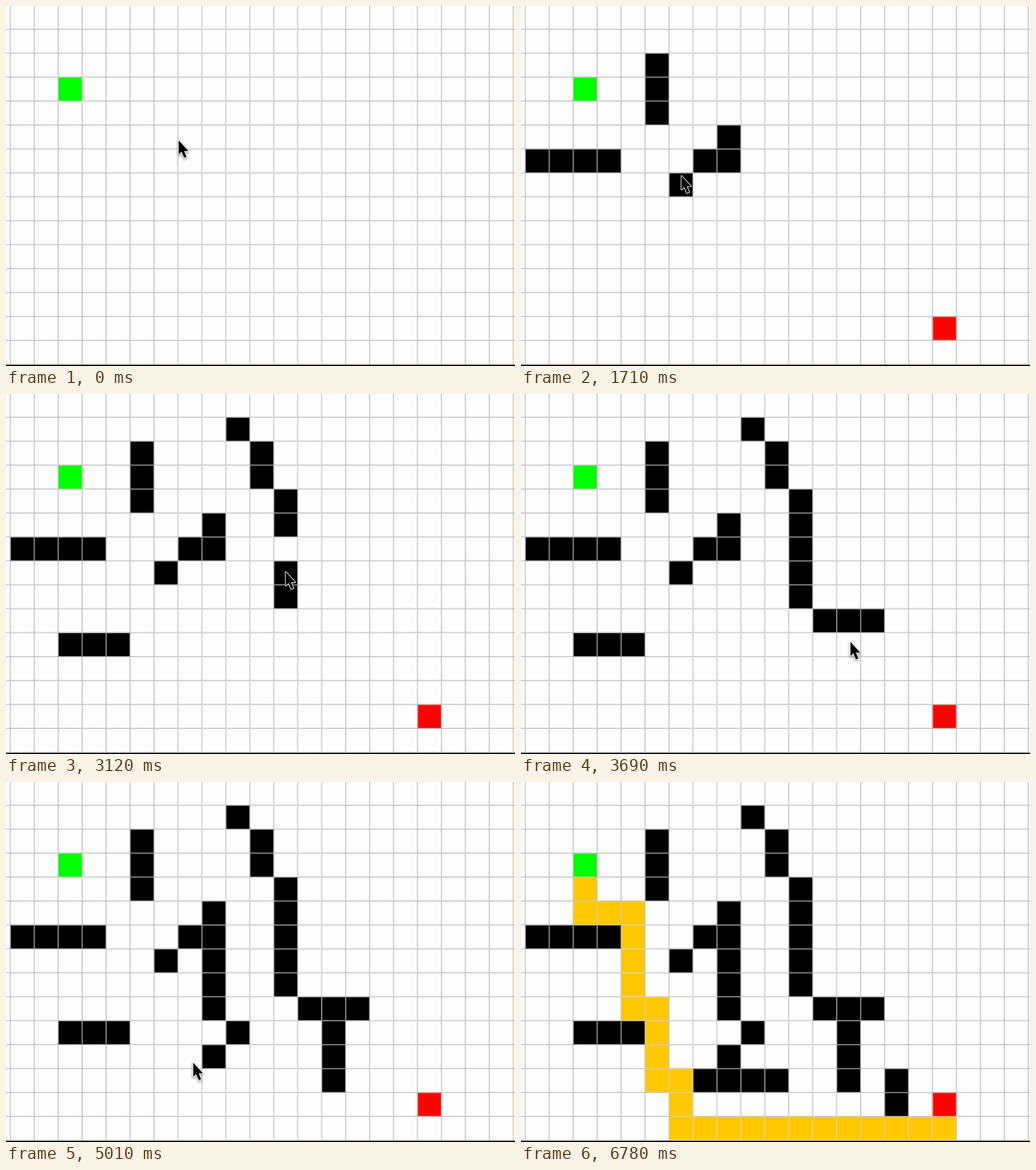
Recreate the animation shown at these times as an HTML page with a canvas. Size 890x629 px, loop 6840 ms.

```html
<!DOCTYPE html>
<html lang="en">
<head>
<meta charset="utf-8">
<title>Grid path finding</title>
<style>
html, body { margin: 0; width: 100%; height: 100%; overflow: hidden; background: #fdfdfd; }
canvas { display: block; }
</style>
</head>
<body>
<canvas id="stage" width="890" height="629"></canvas>
<script>
const ctx = document.getElementById('stage').getContext('2d');
const W = 890, H = 629, LOOP = 6840, TICK = 30;
const COLS = 21, ROWS = 15;
const RED_AT = 240, EXIT_AT = 6060, PATH_AT = 6300;
const CELL_TIME = 90, JUMP_TIME = 125, JUMP_PER_CELL = 18;
const lineX = c => 7.5 + 41.88 * c;
const lineY = r => -1.2 + 41.82 * r;

// Turns a path in cell units into timed cells: M jumps, h and v drag.
function trace(t, path) {
  const cells = [];
  let c, r;
  const add = () => cells.push({ t, c, r });
  for (const [, cmd, a, b] of path.matchAll(/([Mhv])(-?\d+)(?: (\d+))?/g)) {
    const n = +a;
    if (cmd === 'M') {
      if (cells.length) t += JUMP_TIME + JUMP_PER_CELL * Math.hypot(n - c, b - r);
      [c, r] = [n, +b];
      add();
      continue;
    }
    for (let i = 0; i < Math.abs(n); i++) {
      if (cmd === 'h') c += Math.sign(n);
      else r += Math.sign(n);
      t += CELL_TIME;
      add();
    }
  }
  return cells;
}

const walls = [
  ...trace(440, 'M0 6h3M5 2v2M6 7M7 6h1v-1M2 10h2M9 1M10 2v1M11 4v1M11 8v-2M12 9h2M13 10v2'),
  ...trace(4230, 'M9 10M8 11M8 9v-2'),
  ...trace(5100, 'M7 12h3M15 12v1')
];
const route = trace(0, 'M2 4v1h2v4h1v3h1v2h11');

const track = [
  { t: 0, x: 302, y: 236 },
  { t: RED_AT, x: 752, y: 562 },
  ...walls.map(({ t, c, r }) => ({ t, x: lineX(c + 0.5), y: lineY(r + 0.5) })),
  { t: EXIT_AT, x: 690, y: 640 }
];

function pointerAt(t) {
  const i = track.findIndex(k => k.t > t);
  const a = track[i - 1], b = track[i];
  const p = (t - a.t) / (b.t - a.t);
  const ease = p * p * (3 - 2 * p);
  return [a.x + (b.x - a.x) * ease, a.y + (b.y - a.y) * ease];
}

// Lines in the middle third of the stage are wider and paler.
function rule(at, vertical) {
  const third = (vertical ? W : H) / 3;
  const soft = at > third && at < 2 * third;
  const w = soft ? 2.6 : 1.7;
  ctx.fillStyle = soft ? '#d7d7d7' : '#c2c2c2';
  if (vertical) ctx.fillRect(at - w / 2, 0, w, H);
  else ctx.fillRect(0, at - w / 2, W, w);
}

function drawGrid() {
  ctx.fillStyle = '#fdfdfd';
  ctx.fillRect(0, 0, W, H);
  for (let r = 1; r <= ROWS; r++) rule(lineY(r), false);
  for (let c = 0; c <= COLS; c++) rule(lineX(c), true);
  ctx.fillStyle = '#000';
  ctx.fillRect(0, H - 2, W, 2);
}

// A solid square with a faint fringe over its border lines.
function cell(c, r, color) {
  const x = lineX(c), y = lineY(r);
  ctx.fillStyle = color;
  ctx.globalAlpha = 0.2;
  ctx.fillRect(x - 0.4, y - 0.4, 42.6, 42.6);
  ctx.globalAlpha = 1;
  ctx.fillRect(x + 1, y + 1, 40, 40);
}

const arrow = new Path2D('M0 -1V23L5 18.5L9.5 29L13.5 27.5L9.3 17.5L16.5 17Z');
function drawPointer([x, y]) {
  ctx.save();
  ctx.translate(x, y);
  ctx.lineJoin = 'round';
  ctx.lineWidth = 2.6;
  ctx.strokeStyle = '#e4e4e4';
  ctx.save();
  ctx.shadowColor = 'rgba(0,0,0,.45)';
  ctx.shadowBlur = 4;
  ctx.shadowOffsetY = 2;
  ctx.stroke(arrow);
  ctx.restore();
  ctx.fillStyle = '#000';
  ctx.fill(arrow);
  ctx.restore();
}

function draw(t) {
  drawGrid();
  cell(2, 3, '#00ff00');
  if (t >= RED_AT) cell(17, 13, '#ff0000');
  for (const w of walls) if (t >= w.t) cell(w.c, w.r, '#000');
  if (t >= PATH_AT) for (const { c, r } of route) cell(c, r, '#ffc800');
  if (t < EXIT_AT) drawPointer(pointerAt(t));
}

const start = performance.now();
function frame() {
  const t = (performance.now() - start) % LOOP;
  draw(Math.floor(t / TICK) * TICK);
  requestAnimationFrame(frame);
}
frame();
</script>
</body>
</html>
```
